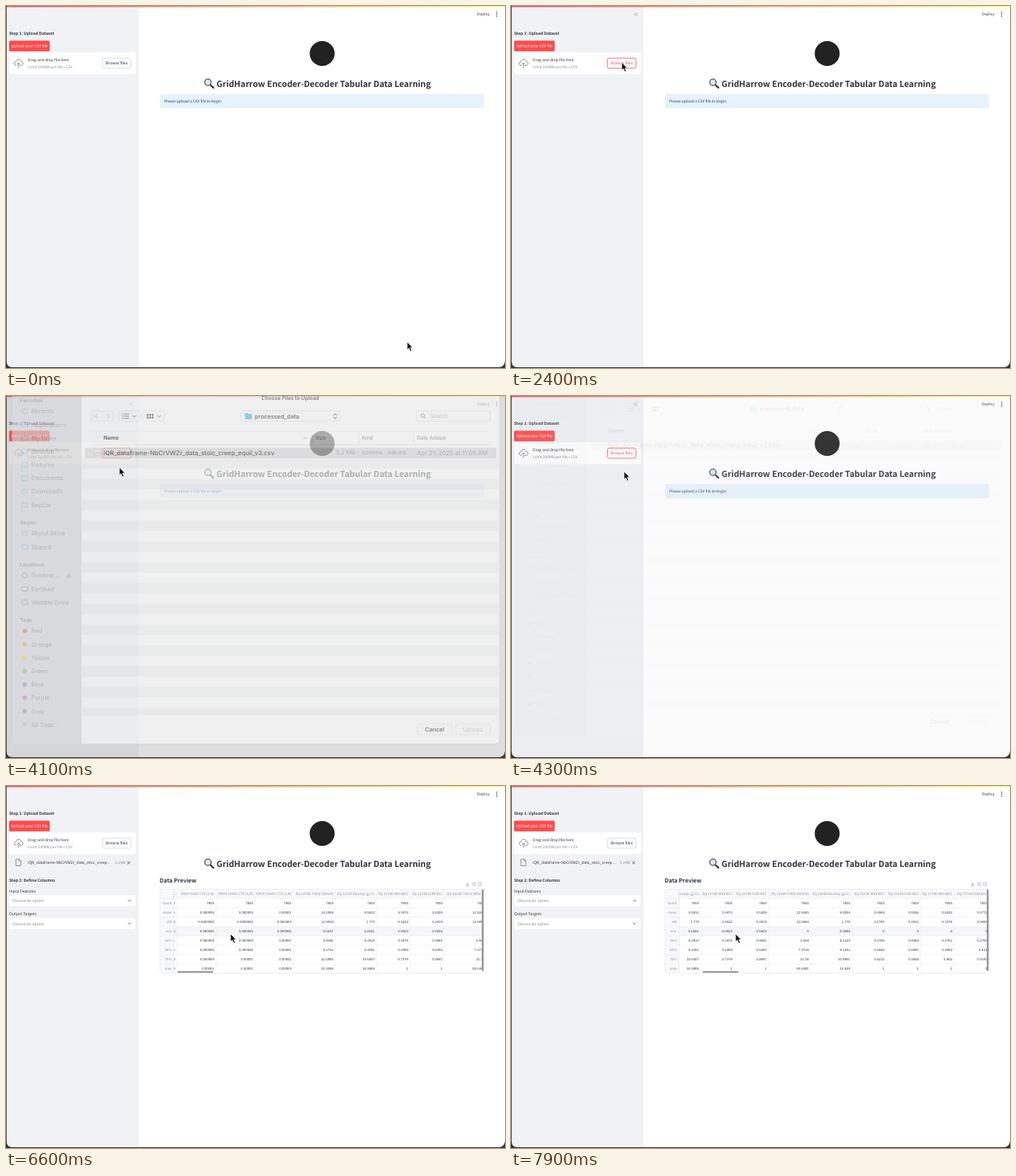
These frames come from a looping animation (640 by 465 pixels, 8 s). An HTML page:

```html
<!DOCTYPE html>
<html lang="en">
<head>
<meta charset="utf-8">
<title>Tabular data learning</title>
<style>
html, body { margin: 0; width: 100%; height: 100%; overflow: hidden; background: #fff; }
svg { display: block; width: 640px; height: 465px; }
text { text-rendering: geometricPrecision; white-space: pre; }
.app { font-family: "Noto Sans CJK JP", "Noto Sans CJK SC", "Noto Sans", sans-serif; }
.mac { font-family: Inter, Roboto, sans-serif; }
</style>
</head>
<body>
<svg id="stage" viewBox="0 0 640 465"></svg>
<script>
const LOOP = 8000, STEP = 100;
const INK = '#31333f', RED = '#ff4b4b', SIDE = '#f0f2f6', FAINT = '#8b8d98', RULE = '#e8e9ee', HEAD = '#f8f9fb';
const BLACK = '#222', SOFT = '#9b9b9e', EDGE = '#dedee0', MUTE = '#77777b';
const FILE = 'IQR_dataframe-NbCrVWZr_data_stoic_creep';

// y is the vertical centre of the capitals
const text = (x, y, s, size, fill = INK, more = '') =>
  `<text x="${x}" y="${y + size * .365}" font-size="${size}" fill="${fill}" ${more}>${s}</text>`;
const rect = (x, y, w, h, fill, r = 0, more = '') =>
  `<rect x="${x}" y="${y}" width="${w}" height="${h}" rx="${r}" fill="${fill}" ${more}/>`;
const line = (d, color = INK, w = .8) =>
  `<path d="${d}" fill="none" stroke="${color}" stroke-width="${w}" stroke-linecap="round" stroke-linejoin="round"/>`;
const group = (id, body, more = '') => `<g id="${id}" ${more}>${body}</g>`;
const BOLD = 'font-weight="700"', MEDIUM = 'font-weight="500"', MID = 'text-anchor="middle"', END = 'text-anchor="end"';

// ---- data table: right edge | heading | mean, std, min, 25%, 50%, 75%, max
const columns = [
  '233|umap1|5.0586 3.5047 -3.3641 2.5608 5.2989 7.7411 12.6379',
  '254|umap2|2.4318 3.1868 -5.1789 0.2646 2.1128 4.6206 10.2473',
  '273|Nb|0.2196 0.1875 0 0.05 0.2 0.35 0.95',
  '292|Cr|0.2106 0.1818 0 0.05 0.15 0.3 0.95',
  '312|V|0.2215 0.1869 0 0.05 0.2 0.35 0.95',
  '332|W|0.139 0.1147 0 0.05 0.1 0.2 0.9',
  '351|Zr|0.2088 0.1794 0 0.05 0.15 0.3 0.9',
  '379|PROP LT (K)|2273.7166 269.2513 1570.2866 2073.1212 2276.1096 2494.7871 3529.9284',
  '407|PROP ST (K)|1811.6655 221.7734 1479.253 1639.581 1764.4576 1911.6368 2675.609',
  '457|PROP 500C CTE (1/K)|0.000009 0.0000006 0.000005 0.000008 0.000009 0.000009 0.00001',
  '507|PROP 1000C CTE (1/K)|0.000009 0.0000006 0.000006 0.000009 0.000009 0.00001 0.00001',
  '556|PROP 1500C CTE (1/K)|0.00001 0.000004 0.000006 0.00001 0.00001 0.00002 0.00003',
  '610|EQ 1273K THCD (W/mK)|14.1058 12.9534 0.0237 3.4296 9.2732 22.6985 62.9246',
  '663|EQ 1273K Density (g/cc)|9.5912 1.773 6.0521 8.2915 9.3191 10.6507 16.9406',
  '706|EQ 1273K MAX BCC|0.5473 0.2622 0.0023 0.3475 0.5494 0.7374 1',
  '750|EQ 1273K SUM BCC|0.6209 0.2819 0.0023 0.4065 0.6355 0.8647 1',
  '804|EQ 1523K THCD (W/mK)|12.9245 12.6893 0 2.564 7.3718 21.35 65.6341',
  '857|EQ 1523K Density (g/cc)|9.4294 1.778 5.9089 8.1129 9.1432 10.4981 16.838',
  '901|EQ 1523K MAX BCC|0.5664 0.2745 0 0.3766 0.5649 0.8215 1',
  '945|EQ 1523K SUM BCC|0.6556 0.2912 0 0.4284 0.6941 0.9568 1',
  '988|EQ 1773K MAX BCC|0.5023 0.3378 0 0.2761 0.5893 0.862 1',
  '1033|EQ 1773K SUM BCC|0.5772 0.3444 0 0.2794 0.611 0.9145 1'
];
const rowY = i => 150.6 + i * 11.95;

function table() {
  const cells = columns.map(c => {
    const [x, head, values] = c.split('|');
    return text(x, 138.6, head, 4.4, FAINT, END) +
      ['7605', ...values.split(' ')].map((v, i) => text(x, rowY(i), v, 4.4, INK, END)).join('') +
      line(`M${+x + 2.2} 133V240`, RULE, .5);
  }).join('');
  const labels = ['count', 'mean', 'std', 'min', '25%', '50%', '75%', 'max'];
  const rules = labels.map((l, i) => line(`M198 ${rowY(i) - 6}H611`, RULE, .5)).join('');
  return text(197, 121, 'Data Preview', 7.3, INK, BOLD) +
    rect(197.5, 132.5, 415, 108, '#fff', 1.5, `stroke="${RULE}" stroke-width=".7"`) +
    rect(198, 133, 413, 11.6, HEAD) +
    group('rowHover', rect(198, rowY(3) - 6, 413, 12, '#f5f6f9')) + rules +
    `<g clip-path="url(#cells)">${group('scroller', cells)}</g>` +
    rect(198, 133, 17.3, 107.5, HEAD) + rules.replaceAll('H611', 'H215') + line('M215.3 133V240', EDGE, .6) +
    labels.map((l, i) => text(212.5, rowY(i), l, 4.4, FAINT, END)).join('') +
    rect(610.4, 133, 2, 104.5, '#85868c', .5) +
    group('thumb', rect(198.5, 238.3, 46, 1.3, '#5c5d63', .6)) +
    group('tools', line('M592 124V127M590.7 126L592 127.3L593.3 126M590.3 128.3H593.7M601.6 127.2L602.8 128.4' +
      'M606 125.5V124.3H607.2M608.4 124.3H609.4V125.5M609.4 127V128H608.4M607.2 128H606V127', FAINT, .6) +
      `<circle cx="600.2" cy="125.8" r="1.6" fill="none" stroke="${FAINT}" stroke-width=".6"/>`);
}

// ---- web page
const select = (y, label) => text(4, y - 12.3, label, 5.05) +
  rect(4, y - 7, 162, 14, '#fff', 2) + text(8, y, 'Choose an option', 5, '#83858f') +
  line(`M156.8 ${y - .8}l1.7 1.8l1.7 -1.8`, '#55565f', .8);

function page() {
  return rect(0, 0, 640, 465, '#fff') + rect(0, 0, 169, 465, SIDE) + line('M169.3 1V465', '#e6e8ed', .6) +
    rect(0, 0, 640, 1.4, 'url(#band)') +
    group('chevron', line('M159.6 9L158 10.6L159.6 12.2M162 9L160.4 10.6L162 12.2', MUTE, .6)) +
    text(4, 35.4, 'Step 1: Upload Dataset', 5.2, INK, BOLD) +
    rect(4, 44.5, 52, 13.8, RED, 1.5) + text(6.6, 51.5, 'Upload your CSV file', 5, '#fff') +
    rect(4, 59.5, 162.5, 28, '#fff', 2) +
    line('M13 76.5C9.5 76.2 9.8 71.8 12.8 71.8C13.5 67.3 19 67.6 19.4 71.4C22.6 71.4 22.6 76.2 19.4 76.5H18M16 79V73.5M14.2 75L16 73.2L17.8 75', '#7b7d88', .9) +
    text(28, 69.6, 'Drag and drop file here', 4.97) +
    text(28, 77.8, 'Limit 200MB per file • CSV', 4.87, FAINT) +
    rect(123.6, 67, 36.6, 13, '#fbfcfd', 2.2, 'id="browse" stroke-width=".8"') +
    text(142, 73.5, 'Browse files', 5, INK, `id="browseText" ${MID}`) +
    group('uploaded',
      line('M13.2 94H16.8L19 96.2V102.4H13.2ZM16.8 94V96.2H19', '#7b7d88', .8) +
      text(28, 98, FILE + '...', 4.9) + text(140, 98, '5.2MB', 4.6, FAINT) +
      line('M155.7 97L158.9 100.2M158.9 97L155.7 100.2', INK, .7)) +
    group('define', text(4, 121.4, 'Step 2: Define Columns', 5.2, INK, BOLD) +
      select(147.3, 'Input Features') + select(176.7, 'Output Targets')) +
    text(604, 10.6, 'Deploy', 4.9) +
    [8, 10.5, 13].map(y => `<circle cx="629.3" cy="${y}" r=".75" fill="${INK}"/>`).join('') +
    '<circle cx="405.5" cy="61" r="16" fill="#222"/>' +
    line('M262.2 101.5L266 105', '#2f3033', 2.2) +
    '<circle cx="259" cy="98" r="4.1" fill="#dcebf2" stroke="#4b4c50" stroke-width="1.3"/>' +
    text(270, 99.7, 'GridHarrow Encoder-Decoder Tabular Data Learning', 10.77, INK, BOLD) +
    group('notice', rect(197.5, 113, 415.5, 18.3, '#e8f2fc', 2) +
      text(203, 122, 'Please upload a CSV file to begin.', 4.87, '#004280')) +
    group('table', table());
}

// ---- file chooser
const places = [
  [15, 'Favorites', [28.5, 'Recents', 'Applications', 'My Drive', 'Desktop', 'Pictures', 'Documents', 'Downloads', 'RepLot']],
  [172, 'Skylot', [185.5, 'Skylot Drive', 'Shared']],
  [226, 'Locations', [239.5, 'Outdoor...', 'FarShelf', 'Wobble Drive']],
  [297, 'Tags', [310.6, 'Red', 'Orange', 'Yellow', 'Green', 'Blue', 'Purple', 'Gray', 'All Tags...']]
];
const tagColors = ['#f4807c', '#f5b070', '#f2d868', '#78d488', '#72aaf0', '#c48cd8', '#a8a8ac', '#c6c6c8'];

function chooser() {
  const list = places.map(([y, title, [top, ...names]]) => text(18, y, title, 6.5, SOFT, BOLD) +
    names.map((n, i) => {
      const cy = top + i * 17.18;
      const icon = title === 'Tags' ? `<circle cx="24" cy="${cy}" r="2.8" fill="${tagColors[i]}"/>`
        : rect(20.3, cy - 2.8, 7.4, 5.6, 'none', i % 3 ? 1.2 : 2.8, `stroke="${title === 'Locations' ? SOFT : '#94c0ea'}" stroke-width=".9"`);
      return icon + text(32.5, cy, n, 7.6, SOFT);
    }).join('')).join('') + line('M77.5 241.5H82.5M78 239.8L80 237L82 239.8Z', SOFT, .7);
  let stripes = '';
  for (let y = 88.8; y < 417; y += 26.72) stripes += rect(97, y, 536, Math.min(13.36, 418 - y), '#f3f4f5');
  const box = (x, w, y = 28, h = 13.5) => rect(x, y, w, h, '#fdfdfd', 3, `stroke="${EDGE}" stroke-width=".7"`);
  const dots = [0, 1, 2, 3, 4, 5].map(i => rect(180.5 + i % 3 * 3.2, 32 + (i > 2 ? 3.4 : 0), 2.3, 2.3, '#4b4b4e')).join('');
  return rect(8, -20, 625, 476, '#fff', 6, 'stroke="#c9c9cc" stroke-width=".6"') +
    '<path d="M8 -20H97V456H14Q8 456 8 450Z" fill="#dfdfe1"/>' + list +
    text(364.5, 11.5, 'Choose Files to Upload', 6.7, BLACK, `${MID} ${MEDIUM}`) +
    box(109, 29) + line('M123.5 29.5V40', EDGE, .6) +
    line('M117 32L114.5 34.8L117 37.6M130 32L132.5 34.8L130 37.6', '#aaaaae', .9) +
    box(145, 27) + line('M149 32H150M149 34.8H150M149 37.6H150M152 32H157.5M152 34.8H157.5M152 37.6H157.5', '#4b4b4e', .9) +
    box(175, 28) + dots + line('M162.5 34L164.5 36L166.5 34M194.5 34L196.5 36L198.5 34', '#4b4b4e', .9) +
    box(301, 127) + rect(306.5, 30.8, 4, 3, '#3fa8d0', 1) + rect(306.5, 31.8, 9, 7, '#55bfe2', 1) +
    text(319, 34.8, 'processed_data', 7.5, BLACK, MEDIUM) +
    line('M420.3 33.6L422.2 31.6L424.1 33.6M420.3 36L422.2 38L424.1 36', BLACK, .9) +
    box(526, 95) + `<circle cx="534.5" cy="34" r="2.2" fill="none" stroke="${MUTE}" stroke-width=".8"/>` +
    line('M536.2 35.7L538 37.6', MUTE, .8) + text(544, 34.8, 'Search', 6.8, '#ababaf') +
    line('M109 54.5H621', '#eeeef0', .6) +
    text(125, 62.8, 'Name', 6.9, BLACK, BOLD) + line('M382 63.8L384 61.8L386 63.8', MUTE, .7) +
    text(397, 62.8, 'Size', 6.6, MUTE) + text(456.5, 62.8, 'Kind', 6.6, MUTE) +
    text(527, 62.8, 'Date Added', 6.6, MUTE) +
    line('M392.8 57V69M453 57V69M523 57V69M109 71.5H621', EDGE, .7) + stripes +
    group('picked', rect(101, 75.4, 528, 13.4, '#dcdcde', 2)) +
    rect(113.5, 77.5, 7, 8, '#eee', .6, 'stroke="#b4b4b8" stroke-width=".5"') +
    line('M114.5 83L116.5 81.5L119.5 83', '#77a080', .9) +
    text(125, 81.6, FILE + '_equil_v3.csv', 7.94, BLACK, MEDIUM) +
    text(448, 81.6, '5.2 MB', 7.6, FAINT, END) + text(456.5, 81.6, 'comma...values', 7.6, FAINT) +
    text(527, 81.6, 'Apr 21, 2025 at 11:05 AM', 7.8, FAINT) +
    line('M97 418.5H633', '#e8e8ea', .6) +
    box(528, 44, 429.8, 14) + text(549.6, 436.8, 'Cancel', 7.5, BLACK, `${MID} ${MEDIUM}`) +
    box(577, 44, 429.8, 14) + text(598.8, 436.8, 'Upload', 7.5, '#bcbcc0', MID);
}

const $ = id => document.getElementById(id);
$('stage').innerHTML =
  `<defs><linearGradient id="band"><stop offset="0" stop-color="#ff4b4b"/><stop offset="1" stop-color="#fffd80"/></linearGradient>
  <clipPath id="cells"><rect x="215.5" y="133" width="395" height="107.5"/></clipPath></defs>` +
  group('page', page(), 'class="app"') +
  rect(0, 0, 640, 465, '#888', 0, 'id="dim"') +
  group('chooser', chooser(), 'class="mac"') +
  '<path d="M0 456V465H640V456Q639 464 632 464H8Q.8 464 .8 456V0H0Z" fill="#333"/>' +
  '<path id="cursor" d="M0 0V10L2.3 8L4 12L5.9 11.2L4.2 7.3H7.2Z" fill="#111" stroke="#fff" stroke-width=".7"/>';

// ---- motion
const clamp = u => Math.max(0, Math.min(1, u));
const smooth = u => u * u * (3 - 2 * u);
const ramp = (t, from, to) => smooth(clamp((t - from) / (to - from)));

function along(keys, t, ease) {
  let i = 0;
  while (i < keys.length - 2 && t >= keys[i + 1][0]) i++;
  const [a, ...p] = keys[i], [b, ...q] = keys[i + 1];
  const u = ease(clamp((t - a) / (b - a)));
  return p.map((v, k) => v + (q[k] - v) * u);
}

const pointer = [[300, 514.5, 431.5], [500, 513, 430], [600, 513, 430], [1800, 148, 79], [2200, 141, 73],
  [2300, 141, 73], [2400, 142, 72.5], [2600, 142, 72.5], [3200, 145, 83.5], [3500, 146, 82], [3800, 146, 82],
  [4300, 145, 97], [5000, 130, 139], [5300, 130, 139], [5400, 128, 143.5], [5600, 130, 145],
  [6100, 288, 190], [8000, 288, 190]];
const scrolled = [[6000, 0], [6600, 190], [7900, 422]];

const show = (id, on) => $(id).setAttribute('visibility', on ? 'visible' : 'hidden');
const set = (id, key, v) => $(id).setAttribute(key, v);

function draw(t) {
  const [x, y] = along(pointer, t, smooth);
  const [scroll] = along(scrolled, t, u => u);
  const open = ramp(t, 2600, 3100) - ramp(t, 3850, 4390);
  const loaded = t >= 4800, inTable = loaded && x > 197;
  const hot = t < 4600 && (t > 2300 || x < 160 && y < 80);

  set('cursor', 'transform', `translate(${x} ${y})`);
  show('chevron', x < 169);
  set('browse', 'stroke', hot ? RED : '#d5d6dc');
  set('browseText', 'fill', hot ? RED : INK);
  show('uploaded', t >= 4600);
  show('define', loaded);
  show('notice', !loaded);
  show('table', loaded);
  show('tools', inTable);
  show('rowHover', inTable);
  set('scroller', 'transform', `translate(${-scroll} 0)`);
  set('thumb', 'transform', `translate(${scroll * .112} 0)`);

  set('dim', 'opacity', open * .5);
  set('chooser', 'opacity', open);
  set('chooser', 'transform', `translate(0 ${-20 * (1 - open)})`);
  show('picked', t >= 3700);
}

function tick(now) {
  draw(Math.floor(now % LOOP / STEP) * STEP);
  requestAnimationFrame(tick);
}
draw(0);
requestAnimationFrame(tick);
</script>
</body>
</html>
```
